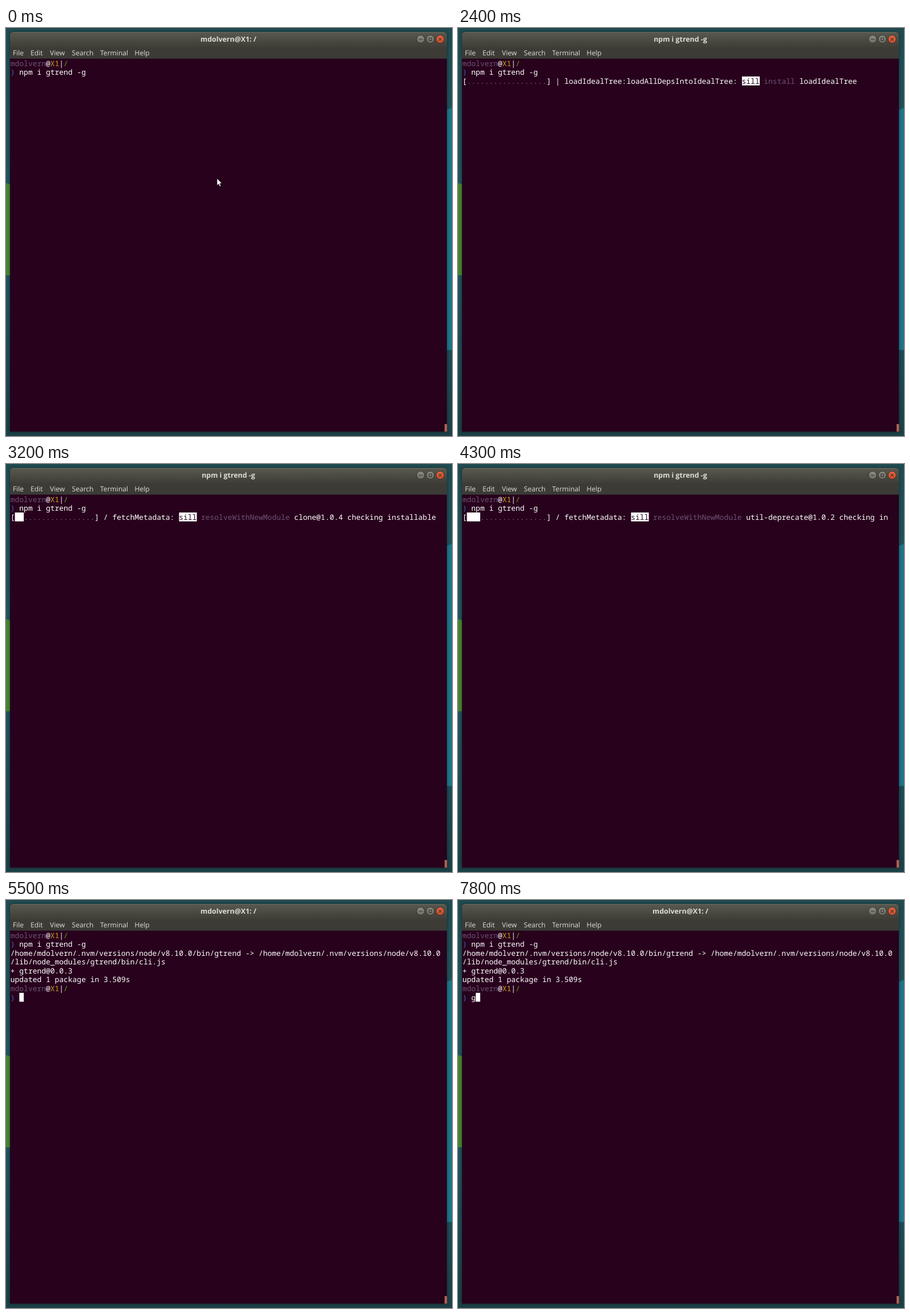
Write an HTML page that moves like this. It is 782 px wide and 716 px high and loops after 8000 ms.

```html
<!DOCTYPE html>
<html lang="en">
<head>
<meta charset="utf-8">
<title>Terminal</title>
<style>
  html, body { margin: 0; width: 100%; height: 100%; overflow: hidden; background: #1d474d; }
  svg { display: block; }
  text { text-rendering: geometricPrecision; white-space: pre; }
  .ui { font: 500 12.1px "Open Sans", "Noto Sans", sans-serif; fill: #e0ddd4; }
  #title { font-weight: 700; font-size: 12.4px; text-anchor: middle; }
  #screen { font: 500 12.967px "Noto Sans Mono", "DejaVu Sans Mono", monospace; }
  #shadow { filter: blur(2px); }
  .white { fill: #fff; }
  .user { fill: #6d5274; }
  .host { fill: #d0a11c; }
  .path { fill: #57a51e; }
  .blue { fill: #3f66b4; }
  .dim { fill: #75637c; }
  .inv { fill: #28021d; }
  .block { fill: #fff; }
  .black { fill: #2e3436; }
</style>
</head>
<body>
<svg width="782" height="716" viewBox="0 0 782 716">
  <defs>
    <linearGradient id="desk" x2="0" y2="1">
      <stop offset="0" stop-color="#1f4b50"/>
      <stop offset=".35" stop-color="#1f5560"/>
      <stop offset=".65" stop-color="#1e5360"/>
      <stop offset="1" stop-color="#1b4046"/>
    </linearGradient>
    <linearGradient id="bar" x2="0" y2="1">
      <stop offset="0" stop-color="#5a594f"/>
      <stop offset="1" stop-color="#3e3d36"/>
    </linearGradient>
    <linearGradient id="grey" x2="0" y2="1">
      <stop offset="0" stop-color="#8f8d83"/>
      <stop offset="1" stop-color="#6b6a62"/>
    </linearGradient>
    <linearGradient id="red" x2="0" y2="1">
      <stop offset="0" stop-color="#ea6642"/>
      <stop offset="1" stop-color="#d04a26"/>
    </linearGradient>
  </defs>
  <rect width="782" height="716" fill="url(#desk)"/>
  <path d="M0 272L8 275V434H0Z" fill="#43872f"/>
  <path d="M772 144L782 140V565H772Z" fill="#1f7487"/>
  <path id="shadow" d="M6.5 709V14Q6.5 6.5 14 6.5H766Q773.5 6.5 773.5 14V709Z" fill="#000" opacity=".35"/>
  <path d="M7 54V13Q7 7 13 7H767Q773 7 773 13V54Z" fill="#3c3b36"/>
  <path d="M7 34V13Q7 7 13 7H767Q773 7 773 13V34Z" fill="url(#bar)"/>
  <path d="M12 7.5H768" stroke="#6c6b61"/>
  <rect x="7" y="53.7" width="766" height="654.6" fill="#28021d"/>
  <rect x="769" y="695" width="4.3" height="13.3" fill="#b3604e"/>
  <g stroke="#34332e">
    <circle cx="727" cy="19.6" r="7" fill="url(#grey)"/>
    <circle cx="744" cy="19.6" r="7" fill="url(#grey)"/>
    <circle cx="761.2" cy="19.6" r="7" fill="url(#red)"/>
    <path d="M723.8 19.8H730.2M741.6 17.3H746.4V21.9H741.6ZM758.7 17.1L763.7 22.1M763.7 17.1L758.7 22.1" fill="none" stroke-width="1.1"/>
  </g>
  <text id="title" class="ui" x="390" y="24"></text>
  <g id="menu"></g>
  <g id="screen"></g>
  <path id="mouse" d="M370 264V276.4L372.8 273.8L374.8 278.2L376.9 277.2L374.9 273L378.4 272.6Z" fill="#fff" stroke="#111" stroke-width=".7"/>
</svg>
<script>
const LOOP = 8000, CELL = 7.78, ROW = 15.56, LEFT = 7.8, TOP = 54, COLS = 96;
const USER = "mdolvern";
const CMD = "npm i gtrend -g";
const $ = id => document.getElementById(id);

$("menu").innerHTML = [["File", 12], ["Edit", 43], ["View", 77], ["Search", 115.5], ["Terminal", 165], ["Help", 225.5]]
  .map(([s, x]) => `<text class="ui" x="${x}" y="48">${s}</text>`).join("");

// A line is a list of [text, text class, background class].
const prompt = [[USER, "user"], ["@", "white"], ["X1", "host"], ["|", "white"], ["/", "path"]];
const input = s => [[") ", "blue"], [s, "white"]];
const plain = s => [[s, "white"]];
const cursor = [" ", "white", "block"];
const withCursor = (line, on) => on ? [...line, cursor] : line;

function clip(line) {
  let left = COLS;
  return line.map(([s, ...rest]) => {
    const part = s.slice(0, left);
    left -= part.length;
    return [part, ...rest];
  });
}

function gauge(done, spin, stage, level, topic, message) {
  const tag = level === "sill" ? ["sill", "inv", "block"] : [level, "blue", "black"];
  return clip([
    ["[", "white"], [" ".repeat(done), "white", "block"], [".".repeat(18 - done), "dim"],
    [`] ${spin} ${stage}: `, "white"], tag, [" ", "white"], [topic, "user"], [" " + message, "white"]
  ]);
}

const session = spin => gauge(0, spin, "rollbackFailedOptional", "verb", "npm-session", "4c1e8a07d25b93f6");
const ideal = spin => gauge(0, spin, "loadIdealTree:loadAllDepsIntoIdealTree", "sill", "install", "loadIdealTree");
const fetching = (done, spin, pkg) =>
  gauge(done, spin, "fetchMetadata", "sill", "resolveWithNewModule", pkg + " checking installable status");

const home = `${USER}@X1: /`;
const nodeDir = `/home/${USER}/.nvm/versions/node/v8.10.0`;
const start = [prompt, input(CMD)];
const output = [
  `${nodeDir}/bin/gtrend -> ${nodeDir}`,
  "/lib/node_modules/gtrend/bin/cli.js",
  "+ gtrend@0.0.3",
  "updated 1 package in 3.509s"
].map(plain);

const typed = on => ({ title: home, lines: [prompt, withCursor(input(CMD), on)] });
const busy = line => ({ title: CMD, lines: [...start, line] });
const done = (s, on) => ({ title: home, lines: [...start, ...output, prompt, withCursor(input(s), on)] });

const steps = [
  [0, { ...typed(false), mouse: true }],
  [500, typed(true)],
  [700, typed(false)],
  [1300, typed(true)],
  [1500, busy([cursor])],
  [1900, busy(session("-"))],
  [2100, busy(session("\\"))],
  [2400, busy(ideal("|"))],
  [2500, busy(fetching(0, "/", "gtrend@0.0.3"))],
  [2600, busy(fetching(0, "-", "chalk@2.4.1"))],
  [2800, busy(fetching(0, "\\", "chalk@2.4.1"))],
  [3000, busy(fetching(1, "|", "columnify@1.5.4"))],
  [3100, busy(fetching(2, "|", "defaults@1.0.3"))],
  [3200, busy(fetching(2, "/", "clone@1.0.4"))],
  [4100, busy(fetching(2, "\\", "readable-stream@2.3.6"))],
  [4200, busy(fetching(3, "|", "string_decoder@1.1.1"))],
  [4300, busy(fetching(3, "/", "util-deprecate@1.0.2"))],
  [5300, busy(fetching(4, "-", "safe-buffer@5.1.2"))],
  [5500, done("", true)],
  [5900, done("", false)],
  [7000, done("", true)],
  [7200, done("", false)],
  [7500, done("", true)],
  [7800, done("g", true)]
];

const esc = s => s.replace(/&/g, "&amp;").replace(/</g, "&lt;").replace(/>/g, "&gt;");

function drawLine(line, row) {
  const y = TOP + row * ROW;
  let col = 0, boxes = "", spans = "";
  for (const [s, ink, back] of line) {
    if (back) boxes += `<rect class="${back}" x="${LEFT + col * CELL}" y="${y}" width="${s.length * CELL}" height="${ROW}"/>`;
    spans += `<tspan class="${ink}">${esc(s)}</tspan>`;
    col += s.length;
  }
  return `${boxes}<text x="${LEFT}" y="${y + 12.6}">${spans}</text>`;
}

function draw({ title, lines, mouse }) {
  $("title").textContent = title;
  $("screen").innerHTML = lines.map(drawLine).join("");
  $("mouse").style.display = mouse ? "" : "none";
}

const begin = performance.now();
let shown;
function tick() {
  const t = (performance.now() - begin) % LOOP;
  const view = steps.filter(([at]) => at <= t).pop()[1];
  if (view !== shown) draw(shown = view);
  requestAnimationFrame(tick);
}
tick();
</script>
</body>
</html>
```
